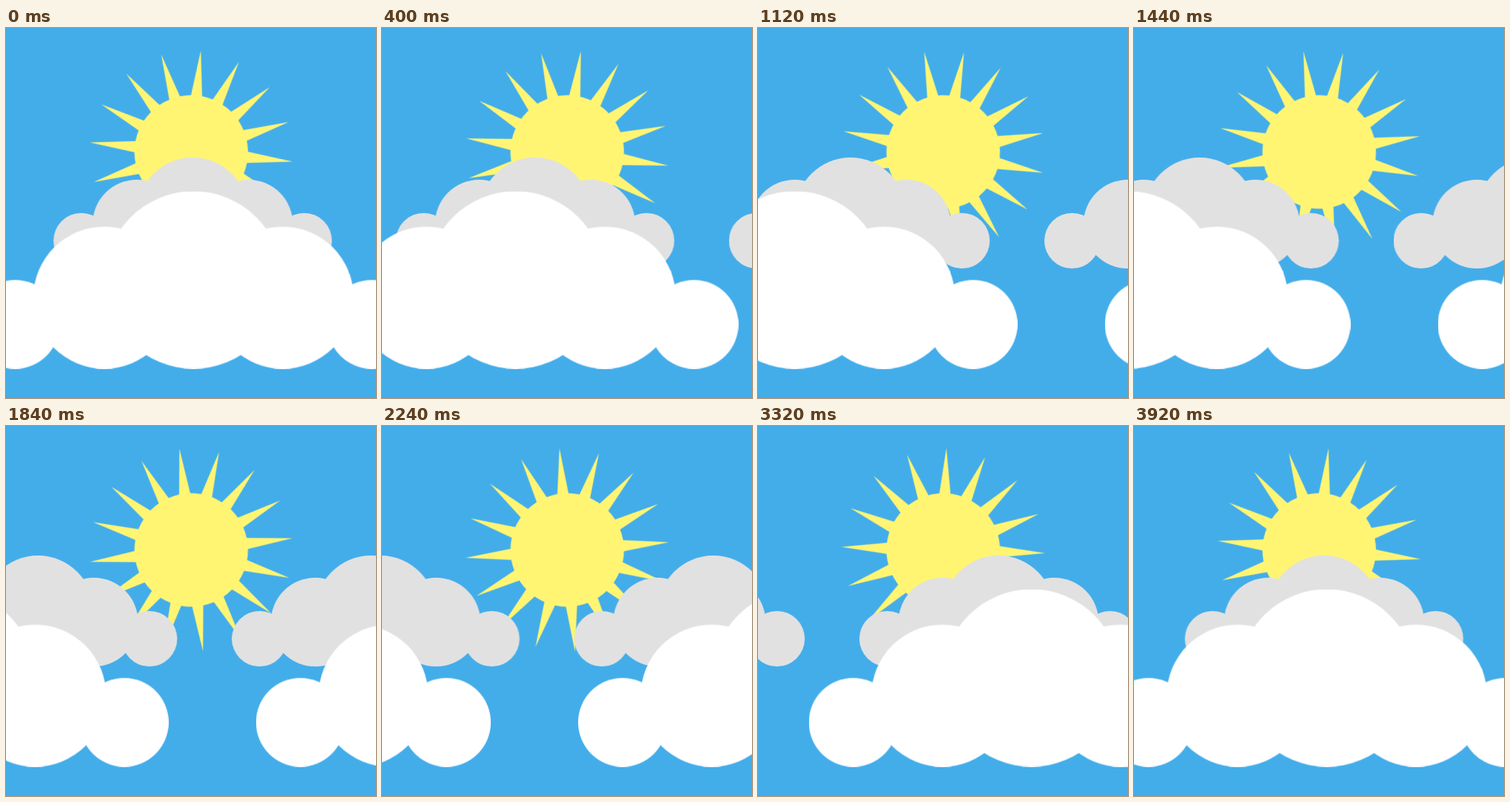
Animation of 500 by 500 pixels, one loop 3.96 s. Source, as an HTML page:

```html
<!DOCTYPE html>
<html lang="en">
<head>
<meta charset="utf-8">
<title>Sun and clouds</title>
<style>
  html, body { margin: 0; width: 100%; height: 100%; overflow: hidden; background: #43adea; }
  svg { display: block; width: 100vw; height: 100vh; }
  .drift { animation: drift 3960ms linear infinite; }
  .spin { animation: spin 3960ms linear infinite; }
  @keyframes drift { to { transform: translate(-720px, 0); } }
  @keyframes spin { to { transform: rotate(22.5deg); } }
</style>
</head>
<body>
<svg viewBox="0 0 500 500">
  <defs>
    <!-- origin: middle of the cloud's base -->
    <g id="cloud">
      <circle cx="-241" cy="-60" r="60"/>
      <circle cx="-120.5" cy="-96" r="96"/>
      <circle cy="-120" r="120"/>
      <circle cx="120.5" cy="-96" r="96"/>
      <circle cx="241" cy="-60" r="60"/>
    </g>
    <g id="row">
      <use href="#cloud"/>
      <use href="#cloud" x="720"/>
    </g>
  </defs>

  <g transform="translate(250.3 167.6) rotate(5.4)" fill="#fff573">
    <g class="spin"><polygon id="rays"/></g>
    <circle r="76.7"/>
  </g>

  <g transform="translate(252.4 325) scale(.625)" fill="#e1e1e1">
    <g class="drift"><use href="#row"/></g>
  </g>

  <g transform="translate(253.5 460.5)" fill="#fff">
    <g class="drift"><use href="#row"/></g>
  </g>
</svg>
<script>
  const RAYS = 16, TIP = 137.7, NOTCH = 53.5;
  const points = Array.from({ length: RAYS * 2 }, (_, i) => {
    const a = i * Math.PI / RAYS;
    const r = i % 2 ? NOTCH : TIP;
    return [r * Math.sin(a), -r * Math.cos(a)].map(v => v.toFixed(2)).join();
  });
  document.getElementById('rays').setAttribute('points', points.join(' '));
</script>
</body>
</html>
```
